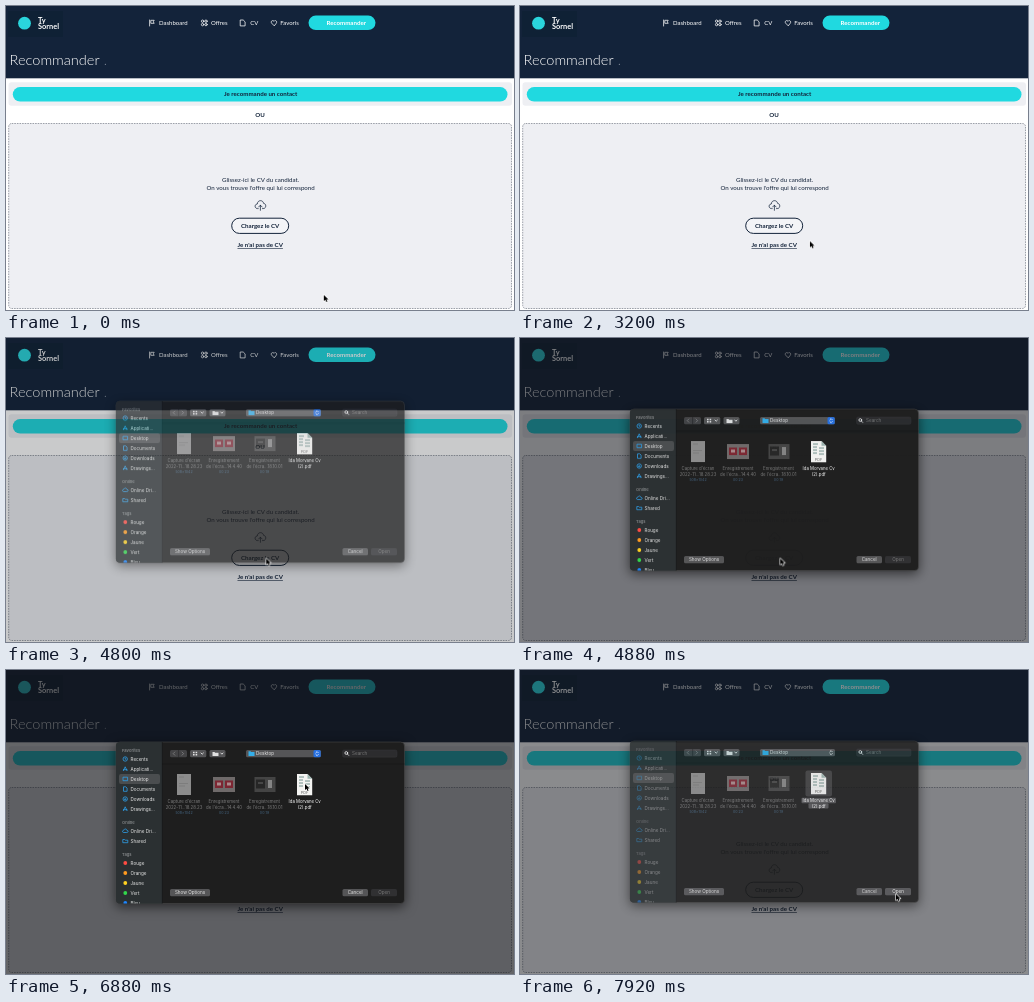
Animation, 508 px wide and 304 px high, one loop 8 s. Source, as an HTML page:

```html
<!DOCTYPE html>
<html lang="fr">
<head>
<meta charset="utf-8">
<title>Recommander</title>
<style>
html, body { margin: 0; width: 508px; height: 304px; overflow: hidden; background: #fff; }
svg { display: block; }
text { font-family: Lato, "Open Sans", sans-serif; font-size: 6.15px; fill: #13233a; white-space: pre; }
.mid { text-anchor: middle; }
.bold { font-weight: 700; }
.nav text { font-size: 6px; fill: #fff; }
.line { fill: none; stroke: #fff; stroke-width: .75; stroke-linecap: round; stroke-linejoin: round; }
.navy { stroke: #13233a; }
.title { font-size: 14.55px; font-weight: 300; fill: #fff; }
.brand text { font-size: 7.4px; font-weight: 700; fill: #fff; }
.dialog text { font-family: Inter, "Liberation Sans", sans-serif; font-size: 4.6px; fill: #e6e6e6; }
.dialog .head { font-size: 4.1px; font-weight: 600; fill: #85888a; }
.dialog .label { font-size: 4.3px; text-anchor: middle; fill: #7d7d7d; }
.dialog .size { font-size: 3.6px; text-anchor: middle; fill: #44647f; }
.dialog .lit { fill: #fff; }
.dialog .faint { fill: #777; }
.btn { fill: #555557; }
.blue { fill: none; stroke: #2f9fe8; stroke-width: .8; stroke-linejoin: round; }
.base { fill: #1e1e1e; stroke: #4c4c4c; stroke-width: .5; filter: drop-shadow(0 3px 6px rgba(0,0,0,.6)); }

.veil, .dialog, .cursor, .picked, .active, .blur { animation: 8s linear infinite; }
.veil { animation-name: veil; }
.dialog { animation-name: sheet; }
.cursor { animation-name: point; }
.picked { animation-name: pick; animation-timing-function: step-end; }
.active { animation-name: focus; animation-timing-function: step-end; }
.blur { animation-name: fade; }

@keyframes veil {
  0%, 58.5% { opacity: 0; }
  59% { opacity: .08; }
  60% { opacity: .22; }
  61% { opacity: .55; }
  63%, 97.5% { opacity: .65; }
  99% { opacity: .49; }
  100% { opacity: .38; }
}
@keyframes sheet {
  0%, 59% { opacity: 0; transform: translateY(-18px); }
  60% { opacity: .72; transform: translateY(-9px); }
  61% { opacity: .98; transform: translateY(-1px); }
  63%, 97.5% { opacity: 1; transform: none; }
  99% { opacity: .86; transform: translateY(-1px); }
  100% { opacity: .7; transform: translateY(-2px); }
}
@keyframes point {
  0%, 31% { transform: translate(317.8px, 289px); animation-timing-function: ease-in; }
  40% { transform: translate(290px, 235.3px); }
  42% { transform: translate(277px, 229.5px); animation-timing-function: ease-out; }
  48%, 68% { transform: translate(260.3px, 220.5px); animation-timing-function: ease-in-out; }
  84%, 89% { transform: translate(299px, 114px); animation-timing-function: ease-in-out; }
  95%, 100% { transform: translate(376px, 224.2px); }
}
@keyframes pick { 0% { opacity: 0; } 88%, 100% { opacity: 1; } }
@keyframes focus { 0% { opacity: 1; } 97.5%, 100% { opacity: 0; } }
@keyframes fade { 0%, 97.5% { opacity: 1; } 98.5%, 100% { opacity: .5; } }
</style>
</head>
<body>
<svg width="508" height="304" viewBox="0 0 508 304">
  <defs>
    <clipPath id="sheetClip"><rect x="110" y="72" width="288.5" height="161.5" rx="4"/></clipPath>
  </defs>

  <rect width="508" height="304" fill="#fff"/>
  <rect width="508" height="72.3" fill="#13233a"/>
  <g class="brand">
    <rect x="2" y="5" width="55" height="26" fill="#0f2135"/>
    <circle cx="18.5" cy="17.2" r="6.4" fill="#2ad5dc"/>
    <text x="32" y="17">Ty</text>
    <text x="32" y="23">Sornel</text>
  </g>
  <g class="nav">
    <path class="line" d="M143.6 14v6M145.2 14.3h3l-.9 1.5.9 1.5h-3z"/>
    <text x="153" y="19">Dashboard</text>
    <g class="line">
      <circle cx="196.6" cy="15.2" r="1.2"/><circle cx="200" cy="15.2" r="1.2"/>
      <circle cx="196.6" cy="18.6" r="1.2"/><circle cx="200" cy="18.6" r="1.2"/>
    </g>
    <text x="205" y="19">Offres</text>
    <path class="line" d="M234.6 14h2.6l1.9 1.9v4h-4.5z"/>
    <text x="244.3" y="19">CV</text>
    <path class="line" d="M268 19.6l-2.4-2.5c-1.3-1.6 1-3.6 2.4-1.8c1.4-1.8 3.7.2 2.4 1.8z"/>
    <text x="274.3" y="19">Favoris</text>
    <rect x="302.5" y="9.5" width="67" height="14.6" rx="7.3" fill="#20d9e0"/>
    <text class="mid bold" x="340.3" y="19" style="font-size:6.2px">Recommander</text>
  </g>
  <text class="title" x="3.6" y="58.5">Recommander</text>
  <circle cx="99.3" cy="58.3" r=".5" fill="#b8c0ca"/>

  <rect x="2.5" y="76.3" width="503.5" height="23.5" rx="3" fill="#eeeff3"/>
  <rect x="6.8" y="81" width="494.7" height="14.6" rx="7.3" fill="#20d9e0"/>
  <text class="mid bold" x="254.7" y="90.4">Je recommande un contact</text>
  <text class="mid bold" x="254" y="110.6">OU</text>

  <rect x="2.7" y="117.5" width="502.8" height="185" rx="3" fill="#eeeff3" stroke="#858993" stroke-width=".8" stroke-dasharray="1.6 1"/>
  <text class="mid" x="254.6" y="175.7">Glissez-ici le CV du candidat.</text>
  <text class="mid" x="254.6" y="184.4">On vous trouve l'offre qui lui correspond</text>
  <path class="line navy" d="M252.2 202.6h-.6c-3.3 0-3.3-4.6-.3-4.6c.2-4.3 5.8-4.4 6.3-.6c3 .2 2.9 5.2-.4 5.2h-.7M254.4 204.3v-5M252.6 201l1.8-1.8 1.8 1.8"/>
  <rect x="225.7" y="212.2" width="57" height="15.2" rx="7.6" fill="#f3f4f7" stroke="#13233a"/>
  <text class="mid bold" x="254.2" y="221.9">Chargez le CV</text>
  <text class="mid bold" x="254.2" y="241.2" text-decoration="underline">Je n'ai pas de CV</text>

  <rect class="veil" width="508" height="304" fill="#111318"/>

  <g class="dialog">
    <rect class="base" x="110" y="72" width="288.5" height="161.5" rx="4"/>
    <g clip-path="url(#sheetClip)">
      <rect x="110" y="72" width="46.3" height="162" fill="#2b3032"/>
      <path d="M156.3 72v162M156.3 94h243" stroke="#111" stroke-width=".5"/>
      <rect x="113" y="104" width="41" height="10" rx="2" fill="#4a4d4f"/>
      <g id="sidebar" class="blur"></g>
    </g>

    <g class="btn">
      <rect x="164" y="80" width="17" height="7.2" rx="1.5" fill="#434345"/>
      <rect x="184" y="80" width="16.3" height="7.2" rx="1.5"/>
      <rect x="203.5" y="80" width="16" height="7.2" rx="1.5"/>
      <rect x="240" y="80" width="75" height="7.2" rx="1.5"/>
    </g>
    <path class="line" stroke-opacity=".35" d="M168.8 82l-1.6 1.6 1.6 1.6M176 82l1.6 1.6-1.6 1.6"/>
    <path d="M172.6 80v7.2" stroke="#1e1e1e" stroke-width=".5"/>
    <path d="M187 81.8h1.6v1.5h-1.6zM189.6 81.8h1.6v1.5h-1.6zM187 84.1h1.6v1.5h-1.6zM189.6 84.1h1.6v1.5h-1.6zM206.5 82h2l.6.7h3.4v3.3h-6z" fill="#e0e0e0"/>
    <path class="line" d="M195 83l1.2 1.2 1.2-1.2M214.8 83l1.1 1.2 1.1-1.2"/>
    <path d="M242.5 81.3h2l.7.8h3.3v4h-6z" fill="#35aee8"/>
    <text x="250" y="85.2">Desktop</text>
    <rect class="active" x="307.5" y="80" width="7.2" height="7.2" rx="1.5" fill="#2770e0"/>
    <path class="line" d="M309.9 82.8l1.2-1.2 1.2 1.2M309.9 84.5l1.2 1.2 1.2-1.2"/>
    <rect x="336.5" y="80" width="54.5" height="7.2" rx="1.5" fill="#2c2c2e" stroke="#3c3c3e" stroke-width=".4"/>
    <circle class="line" cx="340.3" cy="83" r="1.4"/><path class="line" d="M341.4 84.1l1.3 1.3"/>
    <text class="faint" x="346" y="85.2">Search</text>

    <g class="picked">
      <rect x="285.5" y="101.5" width="26.5" height="26" rx="2" fill="#3e3e40"/>
      <g fill="#555557"><rect x="281.5" y="128.7" width="34.5" height="5.6" rx="1"/><rect x="288.5" y="134.2" width="20" height="5.4" rx="1"/></g>
      <g class="active" fill="#1f5cc8"><rect x="281.5" y="128.7" width="34.5" height="5.6" rx="1"/><rect x="288.5" y="134.2" width="20" height="5.4" rx="1"/></g>
    </g>
    <rect x="171" y="104" width="14" height="21" fill="#8c8c8c"/>
    <path d="M173 107h5M173 113.500h9M173 116h6" stroke="#757575" stroke-width=".6"/>
    <rect x="207" y="107" width="22" height="15" fill="#6f6a6a"/>
    <path d="M209 110.500h8v7.500h-8zM219 110.500h8v7.500h-8z" fill="#7c2632"/>
    <path d="M211 112.500h4v3h-4zM221 112.500h4v3h-4z" fill="#a9898b"/>
    <rect x="248.500" y="107" width="21" height="15" fill="#444"/>
    <path d="M250 109.500h9v9h-9z" fill="#262626"/>
    <path d="M252 113h5" stroke="#777" stroke-width=".8"/>
    <path d="M262 110h4v8h-4z" fill="#858585"/>
    <path d="M291 104h10.500l4.700 4.700v16.600h-15.200z" fill="#f4f4f2"/>
    <path d="M301.500 104v4.700h4.700z" fill="#9cb5b0"/>
    <path d="M293 107h5M293 110h4M299 111h5M293 113h4M299 114h5M293 116h4M299 117h5" stroke="#71908c" stroke-width="1"/>
    <text x="298.500" y="123.500" class="mid" style="font-size:3.8px;fill:#666">PDF</text>
    <g id="labels"></g>

    <g class="btn">
      <rect x="164" y="219" width="40" height="7.2" rx="1.5"/>
      <rect x="336.5" y="219" width="25.5" height="7.2" rx="1.5"/>
      <rect x="365" y="219" width="26" height="7.2" rx="1.5" fill="#303032"/>
      <rect class="picked" x="365" y="219" width="26" height="7.2" rx="1.5"/>
    </g>
    <text class="mid" x="184" y="224.3">Show Options</text>
    <text class="mid" x="349.2" y="224.3">Cancel</text>
    <text class="mid faint" x="378" y="224.3">Open</text>
    <text class="mid picked" x="378" y="224.3">Open</text>
  </g>

  <path class="cursor" d="M0 0v6.1l1.5-1.3 1 2.2 1.1-.5-1-2.1h2z" fill="#000" stroke="#fff" stroke-width="1.2" paint-order="stroke" stroke-linejoin="round"/>
</svg>
<script>
const text = (x, y, cls, s) => `<text x="${x}" y="${y}" class="${cls}">${s}</text>`;
const fill = (id, parts) => { document.getElementById(id).innerHTML = parts.join(''); };

const icons = {
  clock: 'M117 0a2.2 2.2 0 1 0 4.4 0a2.2 2.2 0 1 0-4.4 0M119.2-1.3v1.5h1',
  app: 'M117.2 2l2-4.2 2 4.2M117 .7h4.4',
  desk: 'M117-1.8h4.6v3.5h-4.6z',
  doc: 'M117.5-2.2h2.3l1.3 1.3v3.2h-3.6z',
  down: 'M117 0a2.2 2.2 0 1 0 4.4 0a2.2 2.2 0 1 0-4.4 0M119.2-1.2v2.3M118.2.2l1 1 1-1',
  cloud: 'M117.8 1.5c-2 0-1.5-2.5 0-2.2c.6-2 3-1.5 3 0c1.9 0 1.7 2.2 0 2.2z',
  share: 'M116.8-1.5h1.8l.6.7h2.6v2.5h-5z'
};
const places = [
  [89, 'Recents', 'clock'], [99, 'Applicati...', 'app'], [109, 'Desktop', 'desk'],
  [119, 'Documents', 'doc'], [129, 'Downloads', 'down'], [139, 'Drawings...', 'app'],
  [161, 'Online Dri...', 'cloud'], [171, 'Shared', 'share']
];
const tags = [['Rouge', '#ff4b42'], ['Orange', '#ff9a1f'], ['Jaune', '#ffd020'], ['Vert', '#32d74b'], ['Bleu', '#1c86ff']];

fill('sidebar', [
  text(116, 82, 'head', 'Favorites'), text(116, 154, 'head', 'Online'), text(116, 185.6, 'head', 'Tags'),
  ...places.map(([y, s, icon]) =>
    `<path class="blue" transform="translate(0 ${y})" d="${icons[icon]}"/>` + text(124.5, y + 1.7, '', s)),
  ...tags.map(([s, color], i) =>
    `<circle cx="119.3" cy="${193 + i * 10}" r="1.9" fill="${color}"/>` + text(124.5, 194.7 + i * 10, '', s))
]);

const files = [
  [178, "Capture d'écran", '2022-11...18.28.23', '508×1042'],
  [218, 'Enregistrement', "de l'écra...14.4.40", '00:23'],
  [258.5, 'Enregistrement', "de l'écra...18.10.01", '00:19'],
  [298.7, 'Ida Morvane Cv', '(2).pdf', '']
];
fill('labels', files.map(([x, a, b, size]) => {
  const cls = size ? 'label' : 'label lit';
  return text(x, 133.2, cls, a) + text(x, 138.6, cls, b) + text(x, 143.6, 'size', size);
}));
</script>
</body>
</html>
```
